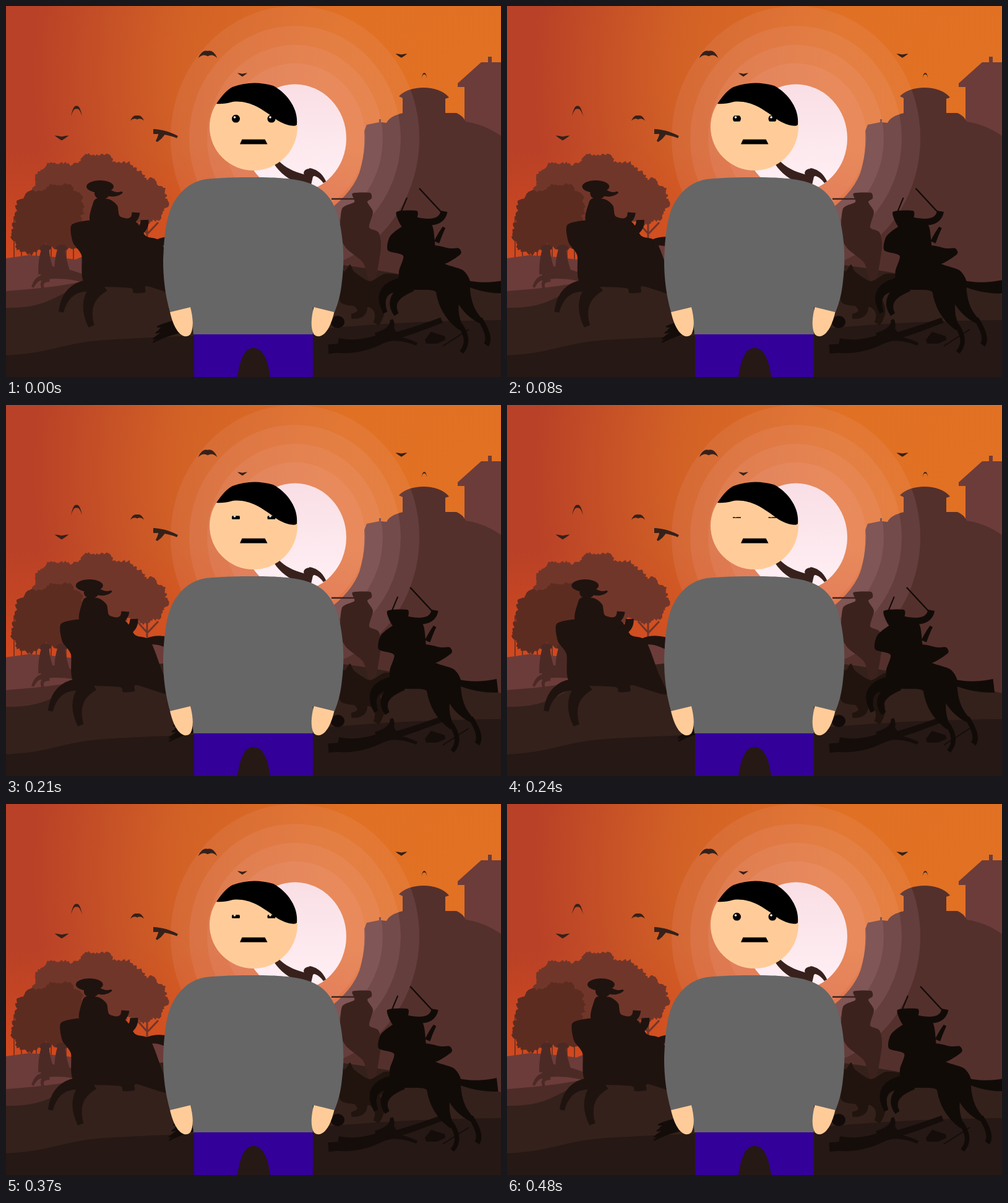
Recreate the animation shown at these times as an HTML page. Size 800 by 600 pixels, loop 520 ms.

```html
<!DOCTYPE html>
<html lang="en">
<head>
<meta charset="utf-8">
<title>Blink</title>
<style>
  html, body { margin: 0; width: 100%; height: 100%; overflow: hidden; background: #261814; }
  svg { display: block; width: 100vw; height: 100vh; }
</style>
</head>
<body>
<svg viewBox="0 0 800 600" preserveAspectRatio="none">
  <defs>
    <radialGradient id="sky" gradientUnits="userSpaceOnUse" cx="760" cy="110" r="780">
      <stop offset="0" stop-color="#e27123"/>
      <stop offset=".3" stop-color="#e07024"/>
      <stop offset=".62" stop-color="#d26126"/>
      <stop offset=".92" stop-color="#b94127"/>
    </radialGradient>
    <linearGradient id="dusk" x1="0" y1="0" x2="0" y2="1">
      <stop offset="0" stop-color="#d94c1c" stop-opacity="0"/>
      <stop offset="1" stop-color="#d94c1c"/>
    </linearGradient>
    <linearGradient id="sun" x1="0" y1="0" x2="0" y2="1">
      <stop offset="0" stop-color="#f9dfe5"/>
      <stop offset="1" stop-color="#fff0f5"/>
    </linearGradient>
    <clipPath id="lids"><rect id="lidGap" x="350" width="100"/></clipPath>
  </defs>
  <rect width="800" height="600" fill="url(#sky)"/>
  <rect y="230" width="800" height="180" fill="url(#dusk)" opacity=".75"/>
  <g id="scene"></g>
  <g id="leftRider"></g>
  <g id="brush"></g>
  <g id="rightRider"></g>
  <g id="man">
    <path fill="#309" d="M304 530H496V600H427C424 575 416 553 400 553S378 575 374 600H304Z"/>
    <path fill="#666" d="M400 277C442 277 462 279 482 284C514 292 531 314 539 349C546 383 547 413 543 445C541 465 537 480 531 495L496 487V531H303L298 487L265 495C258 470 254 443 254 412C255 380 258 344 268 324C280 299 299 284 323 280C343 278 365 277 400 277Z"/>
    <path id="hand" fill="#fc9" d="M265 495L298 487C302 503 304 520 298 531C290 539 274 534 265 495Z"/>
    <use href="#hand" transform="matrix(-1 0 0 1 795.5 0)"/>
    <ellipse cx="400" cy="195.5" rx="71" ry="70.5" fill="#fc9"/>
    <path d="M340 158Q354 137 366 131Q398 119 432 129C456 142 473 168 470 192C466 197 447 191 436 183C412 165 392 152 366 155Q352 159 340 158Z"/>
    <g id="eyes" clip-path="url(#lids)"></g>
    <path d="M378 223.500L381.500 215.800H418.500L422.500 223.500Z"/>
  </g>
</svg>
<script>
const STEP = 80, LOOP = 520;
const $ = id => document.getElementById(id);

let seed = 7;
const random = () => (seed = seed * 16807 % 2147483647) / 2147483647;

function add(parent, tag, attrs) {
  const node = document.createElementNS('http://www.w3.org/2000/svg', tag);
  for (const key in attrs) node.setAttribute(key, attrs[key]);
  return parent.appendChild(node);
}

// Drawing tools for one layer in one colour.
function pen(parent, fill) {
  const path = d => add(parent, 'path', { d, fill });
  return {
    path,
    oval: (cx, cy, rx, ry = rx) => add(parent, 'ellipse', { cx, cy, rx, ry, fill }),
    line: (width, d) => add(parent, 'path', { d, fill: 'none', stroke: fill, 'stroke-width': width }),

    // Closed curve through the points, lightly rounded.
    shape(text) {
      const p = text.split(' ').map(s => s.split(',').map(Number));
      const at = i => p[(i + p.length) % p.length];
      const pull = (a, b, c) => a.map((v, k) => v + (c[k] - b[k]) * 0.12);
      path('M' + p[0] + p.map((a, i) => {
        const b = at(i + 1);
        return `C${pull(a, at(i - 1), b)} ${pull(b, at(i + 2), a)} ${b}`;
      }).join('') + 'Z');
    },

    // Bent limb whose width runs from w0 to w1.
    limb([x0, y0], [cx, cy], [x1, y1], w0, w1) {
      const left = [], right = [];
      for (let t = 0; t <= 1.01; t += 0.1) {
        const s = 1 - t, w = (w0 * s + w1 * t) / 2;
        const x = s * s * x0 + 2 * s * t * cx + t * t * x1;
        const y = s * s * y0 + 2 * s * t * cy + t * t * y1;
        const angle = Math.atan2(s * (cy - y0) + t * (y1 - cy), s * (cx - x0) + t * (x1 - cx));
        const dx = Math.sin(angle) * w, dy = Math.cos(angle) * w;
        left.push([x + dx, y - dy]);
        right.unshift([x - dx, y + dy]);
      }
      path('M' + left.concat(right).join('L') + 'Z');
    },

    // Round mass of leaves with a frayed edge.
    foliage(cx, cy, r) {
      const edge = [];
      for (let a = 0; a < 2 * Math.PI; a += 2.5 / r) {
        const k = r + 2 * Math.sin(a * 9) + random() * 5 - 2.5;
        edge.push([cx + k * Math.cos(a), cy + k * Math.sin(a)]);
      }
      path('M' + edge.join('L') + 'Z');
    },

    bird(x, y, span, arch) {
      const s = span / 2, tip = arch * s;
      path(`M${x - s} ${y + tip}Q${x - s * 0.6} ${y - s * 0.3} ${x} ${y - s * 0.15}` +
        `Q${x + s * 0.6} ${y - s * 0.3} ${x + s} ${y + tip}` +
        `Q${x + s * 0.5} ${y + s * 0.1} ${x} ${y + s * 0.4}Q${x - s * 0.5} ${y + s * 0.1} ${x - s} ${y + tip}Z`);
    }
  };
}

function drawLandscape(g) {
  pen(g, '#6c3c3a').path('M741 220V131H730V125L768 91H779V82H785V91H800V220Z');
  const rock = pen(g, '#54302c');
  rock.path('M579 202L583 192L603 188V183H606V188L615 189Q620 178 642 173H728Q738 177 743 187Q772 191 800 210V480H500V345Q556 310 571 270Q581 238 579 202Z');
  rock.path('M641 180V149L635 146C652 127 700 127 716 148L710 150V180Z');
  for (const rx of [201, 171, 142, 114])
    add(g, 'ellipse', { cx: 467, cy: 214, rx, ry: rx * 1.065, fill: '#f0b8c4', opacity: 0.1 });
  pen(g, 'url(#sun)').oval(467, 214, 83, 87.500);

  const backTree = pen(g, '#71362a'), frontTree = pen(g, '#5d2c21');
  backTree.foliage(86, 295, 42);
  backTree.foliage(146, 285, 46);
  backTree.foliage(183, 298, 46);
  backTree.foliage(224, 315, 37);
  backTree.foliage(150, 335, 45);
  backTree.line(3, 'M228 340V382M228 368L212 350M229 368L246 350');
  frontTree.foliage(50, 335, 36);
  frontTree.foliage(87, 325, 38);
  frontTree.foliage(40, 368, 32);
  frontTree.foliage(92, 362, 34);
  for (let x = 13; x < 110; x += 12) frontTree.line(1.500, `M${x} ${x < 20 ? 340 : 385}V410`);

  const ground = (fill, curve) => pen(g, fill).path(curve + 'V600H0Z');
  ground('#6c3c3a', 'M0 408L36 403Q80 405 112 410Q190 378 270 376');
  ground('#4d2c28', 'M0 461Q90 455 150 440T270 420');
  ground('#34211b', 'M0 488C70 489 75 468 150 439S440 400 586 425S740 452 800 466');
  ground('#261814', 'M0 565C70 562 90 546 150 541S400 531 520 521S700 509 800 508');
}

function drawBirds(g) {
  const ink = pen(g, '#35211a');
  for (const [x, y, span] of [[90, 213, 23], [382, 111, 16], [639, 80, 19]]) ink.bird(x, y, span, -0.3);
  for (const [x, y, span] of [[114, 163, 18], [676, 109, 9]]) ink.bird(x, y, span, 1.700);
  for (const [x, y, span] of [[326, 75, 31], [212, 179, 22]]) ink.bird(x, y, span, 0.6);
  ink.limb([238, 203], [258, 203], [277, 212], 8, 4);
  ink.limb([252, 205], [249, 213], [243, 219], 11, 3);
}

function drawFarRiders(g) {
  const pair = pen(g, '#4b2a25');
  for (const x of [64, 90]) {
    pair.oval(x, 391, 9, 5);
    pair.limb([x, 390], [x - 3, 408], [x + 1, 432], 11, 26);
  }
  pair.limb([56, 432], [85, 428], [127, 441], 24, 12);
  pair.limb([66, 440], [50, 436], [43, 455], 10, 4);
  pair.limb([70, 442], [54, 444], [60, 457], 8, 4);

  const arm = pen(g, '#38211d');
  arm.limb([437, 253], [455, 276], [494, 285], 9, 20);
  arm.oval(491, 270, 10, 7);
  arm.limb([490, 268], [506, 269], [515, 285], 12, 5);

  const guard = pen(g, '#3c221d');
  guard.shape('560,303 588,302 591,311 584,317 593,333 587,358 602,366 606,390 597,443 586,443 577,415 550,392 540,370 543,328 563,317');
  guard.line(2.500, 'M526 312H565');

  const horse = pen(g, '#21140f');
  horse.shape('540,428 548,429 556,418 563,430 588,445 612,433 638,436 630,455 606,470 600,486 570,486 540,478');
  horse.limb([590, 475], [612, 490], [598, 514], 24, 10);
  horse.limb([570, 476], [585, 500], [558, 502], 22, 8);
  pen(g, '#120b09').oval(536, 511, 11, 10);
}

function drawDebris(g) {
  const wood = pen(g, '#150d0a');
  wood.limb([521, 555], [595, 550], [704, 508], 15, 9);
  wood.limb([600, 538], [628, 525], [623, 507], 20, 5);
  wood.limb([615, 538], [640, 536], [664, 547], 8, 5);
  wood.limb([536, 549], [580, 556], [630, 526], 24, 14);
  wood.path('M677 540L687 527L709 534L710 540L697 546H679Z');
  wood.line(2, 'M706 550L748 523');
}

function drawLeftRider(g) {
  const ink = pen(g, '#1f130f');
  ink.shape('106,354 140,346 205,346 226,372 250,381 270,432 283,468 228,453 225,463 206,464 200,456 128,449 122,403 108,382');
  ink.shape('138,350 141,318 148,311 168,313 180,323 184,340 205,348');
  ink.oval(152, 292, 22, 10);
  ink.oval(155, 303, 12, 10);
  ink.limb([158, 297], [174, 309], [188, 301], 14, 3);
  ink.limb([180, 344], [208, 356], [210, 334], 8, 13);
  ink.limb([200, 368], [225, 366], [224, 346], 14, 13);
  ink.limb([138, 452], [97, 452], [89, 495], 20, 8);
  ink.limb([156, 450], [121, 475], [138, 518], 26, 10);
  ink.limb([236, 388], [255, 373], [290, 388], 8, 20);
}

function drawBrush(g) {
  const ink = pen(g, '#130c09');
  for (let i = 0; i < 6; i++)
    ink.limb([295, 516], [265, 514 + i * 2], [237 + random() * 14, 519 + i * 5], 22, 2);
}

function drawRightRider(g) {
  const ink = pen(g, '#110b08');
  ink.line(2.400, 'M668 295L706 336');
  ink.line(2, 'M648 310L638 334');
  ink.shape('631,333 663,331 665,341 658,358 640,357');
  ink.shape('648,353 688,354 698,410 738,427 750,446 744,472 712,476 690,460 640,457 635,430 642,404 617,395 621,372');
  ink.limb([662, 347], [704, 356], [708, 332], 11, 11);
  ink.limb([696, 382], [702, 368], [708, 358], 9, 5);
  ink.shape('690,388 718,392 732,392 735,401 712,416 690,418');
  ink.limb([744, 448], [775, 458], [809, 454], 9, 22);
  ink.limb([650, 449], [594, 452], [613, 496], 24, 7);
  ink.limb([655, 452], [614, 472], [631, 499], 20, 8);
  ink.limb([716, 458], [712, 494], [736, 522], 44, 8);
  ink.limb([734, 516], [752, 542], [736, 560], 8, 7);
  ink.limb([735, 455], [742, 492], [768, 510], 30, 8);
  ink.limb([766, 506], [785, 536], [776, 548], 8, 9);
}

function drawEyes(g) {
  for (const x of [371.500, 429]) {
    pen(g, '#000').oval(x, 182.300, 6.500);
    pen(g, '#fff').oval(x - 2, 180, 1.800);
  }
}

const scene = $('scene');
[drawLandscape, drawBirds, drawFarRiders, drawDebris].forEach(draw => draw(scene));
drawLeftRider($('leftRider'));
drawBrush($('brush'));
drawRightRider($('rightRider'));
drawEyes($('eyes'));

const slide = (id, dx) => $(id).setAttribute('transform', `translate(${dx} 0)`);

// The pose goes out in three held steps and returns the same way.
function render(ms) {
  const step = Math.floor(ms % LOOP / STEP);
  const pose = Math.min(step, 6 - step);
  slide('leftRider', -8.600 * pose);
  slide('rightRider', -7.400 * pose);
  slide('brush', 13 * pose);
  const gap = 6.800 - 2 * pose;
  $('lidGap').setAttribute('y', 182 - gap);
  $('lidGap').setAttribute('height', 2 * gap);
}

const start = performance.now();
function tick() {
  render(performance.now() - start);
  requestAnimationFrame(tick);
}
render(0);
requestAnimationFrame(tick);
</script>
</body>
</html>
```
